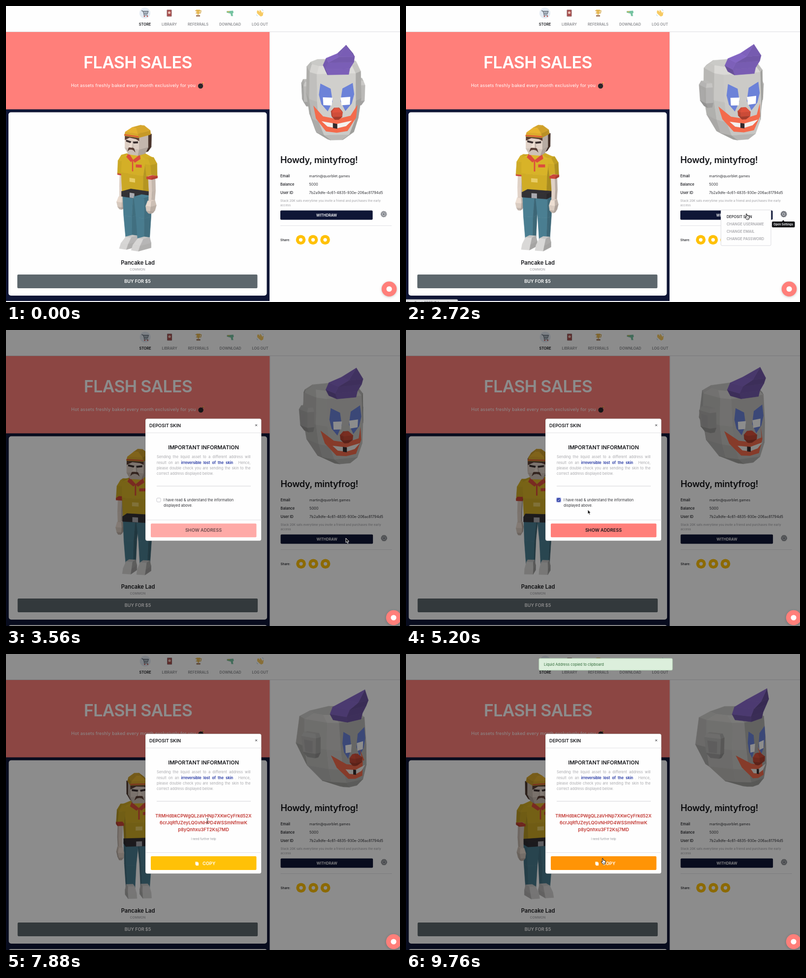
Animation, 800 px wide and 603 px high, one loop 9800 ms. Source, as an HTML page with a canvas:

```html
<!DOCTYPE html>
<html lang="en">
<head>
<meta charset="utf-8">
<title>Store</title>
<style>
html, body { margin: 0; width: 100%; height: 100%; overflow: hidden; background: #fefefe; }
canvas { display: block; width: 800px; height: 603px; }
</style>
</head>
<body>
<canvas id="stage" width="800" height="603"></canvas>
<script>
const ctx = document.getElementById('stage').getContext('2d');
const LOOP = 9800;
const CORAL = '#ff7f7a', NAVY = '#0f1636', AMBER = '#ffc107', INK = '#15161a', GREY = '#a9a9ad';
const MODAL_AT = 2920, CHECK_AT = 4740, ADDRESS_AT = 5950, TOAST_AT = 8720;
const clamp = v => Math.max(0, Math.min(1, v));
const ramp = (t, a, b) => { const k = clamp((t - a) / (b - a)); return k * k * (3 - 2 * k); };

// ---- drawing helpers ----
function text(s, x, y, size, weight, color, align = 'left', spacing = 0) {
  ctx.font = `${weight} ${size}px Inter, sans-serif`;
  ctx.letterSpacing = spacing + 'px';
  ctx.textAlign = align;
  ctx.fillStyle = color;
  ctx.fillText(s, x, y + size * 0.363);
  ctx.letterSpacing = '0px';
}
function box(x, y, w, h, r, fill, stroke) {
  ctx.beginPath();
  ctx.roundRect(x, y, w, h, r);
  if (fill) { ctx.fillStyle = fill; ctx.fill(); }
  if (stroke) { ctx.strokeStyle = stroke; ctx.lineWidth = 1; ctx.stroke(); }
}
function disc(x, y, r, fill) {
  ctx.beginPath();
  ctx.arc(x, y, r, 0, 7);
  ctx.fillStyle = fill;
  ctx.fill();
}
function poly(points, fill, stroke, width = 1) {
  ctx.beginPath();
  points.forEach(p => ctx.lineTo(p[0], p[1]));
  if (fill) { ctx.closePath(); ctx.fillStyle = fill; ctx.fill(); }
  if (stroke) { ctx.lineWidth = width; ctx.strokeStyle = stroke; ctx.lineJoin = 'round'; ctx.stroke(); }
}
function at(x, y, alpha, draw) {
  ctx.save();
  ctx.translate(x, y);
  ctx.globalAlpha *= alpha;
  draw();
  ctx.restore();
}
function rule(x, y, w, color = '#e2e2e6') {
  ctx.fillStyle = color;
  ctx.fillRect(x, y, w, 1);
}

// ---- low-poly models: stacked rings with flat shading ----
const ring = (y, x0, x1, z0, z1) => [[x0, y, z1], [x1, y, z1], [x1, y, z0], [x0, y, z0]];
const octagon = (y, wf, zf, ws, zm, zn, wb, zb) =>
  [[-wf, y, zf], [wf, y, zf], [ws, y, zm], [ws, y, zn], [wb, y, zb], [-wb, y, zb], [-ws, y, zn], [-ws, y, zm]];
const flip = pts => pts.map(([x, y, z]) => [-x, y, z]);
const mesh = (color, rings, decals = [], bias = 0) => ({ color, rings, decals, bias });
const mirrored = m => mesh(m.color, m.rings.map(flip), [], m.bias);
const decal = (color, pts, z) => ({ color, pts: pts.map(p => [p[0], p[1], p[2] ?? z]) });
const mean = pts => [0, 1, 2].map(i => pts.reduce((s, p) => s + p[i], 0) / pts.length);

function shade([r, g, b], k) {
  return `rgb(${[r, g, b].map(v => Math.min(255, v * k) | 0)})`;
}
function drawModel(meshes, cx, cy, degrees, tilt) {
  const c = Math.cos(degrees * Math.PI / 180), s = Math.sin(degrees * Math.PI / 180);
  const view = ([x, y, z]) => {
    const depth = z * c - x * s;
    return [cx + x * c + z * s, cy + y + depth * tilt, depth - y * tilt];
  };
  const spin = ([x, , z]) => z * c - x * s;
  const sorted = meshes.map(m => ({ m, depth: spin(mean(m.rings.flat())) + m.bias }))
    .sort((a, b) => a.depth - b.depth);
  for (const { m } of sorted) {
    const rings = m.rings.map(r => r.map(view));
    const middle = mean(rings.flat());
    const faces = [rings[0], rings[rings.length - 1]];
    for (let i = 1; i < rings.length; i++) {
      rings[i].forEach((p, j) => {
        const k = (j + 1) % rings[i].length;
        faces.push([rings[i - 1][j], rings[i - 1][k], rings[i][k], p]);
      });
    }
    for (const f of faces) {
      const [a, b] = [[f[2], f[0]], [f[3], f[1]]].map(([p, q]) => p.map((v, i) => v - q[i]));
      let n = [a[1] * b[2] - a[2] * b[1], a[2] * b[0] - a[0] * b[2], a[0] * b[1] - a[1] * b[0]];
      const size = Math.hypot(...n);
      if (size < 0.01) continue;
      const fc = mean(f);
      const out = n.reduce((sum, v, i) => sum + v * (fc[i] - middle[i]), 0) < 0 ? -1 : 1;
      n = n.map(v => v * out / size);
      if (n[2] <= 0) continue;
      const light = -0.12 * n[0] - 0.5 * n[1] + 0.8 * n[2];
      const color = shade(m.color, 0.72 + 0.3 * Math.max(0, light));
      poly(f, color, color, 0.6);
    }
    m.decals.forEach(d => poly(d.pts.map(view), d.color));
  }
}

// ---- mask ----
const wrap = pts => pts.map(([x, y]) => [x, y, 56 - Math.max(0, Math.abs(x) - 36) * 3]);
const eye = [[-33, -37], [-12, -26], [-8, 0], [-18, 20], [-31, 5], [-36, -14]];
const pupil = [[-28, -9], [-8, -8], [-10, 8], [-27, 7]];
const smile = [[-45, 12], [-28, 29], [0, 35], [28, 29], [45, 12], [41, 36], [22, 60], [0, 63], [-22, 60], [-41, 36]];
const teeth = [[-31, 39], [0, 45], [31, 39], [19, 50], [0, 54], [-19, 50]];
const BLUE = '#6c82d8', RED = '#f46b4c', BONE = [222, 221, 218];
const ear = mesh([205, 204, 202],
  [ring(-30, -60, -48, -30, 0), ring(-22, -63, -48, -34, 4), ring(10, -62, -46, -30, 2), ring(20, -56, -46, -24, -4)],
  [decal('#aaa9a8', [[-63.5, -16, -27], [-63.5, -16, -4], [-62.5, 8, -5], [-62.5, 8, -24]])], 1);
const mask = [
  mesh(BONE, [
    octagon(-68, 34, 30, 46, 10, -15, 30, -40),
    octagon(-55, 40, 46, 52, 25, -35, 36, -62),
    octagon(0, 40, 51, 53, 25, -35, 40, -68),
    octagon(40, 37, 54, 47, 25, -32, 30, -50),
    octagon(68, 26, 54, 38, 25, 0, 20, -10),
    octagon(79, 12, 50, 17, 40, 30, 8, 25)
  ], [
    decal(BLUE, eye, 52), decal(BLUE, flip(eye), 52),
    decal('#ffffff', pupil, 53), decal('#ffffff', flip(pupil), 53),
    decal(RED, wrap(smile)), decal('#f3f1ee', wrap(teeth)),
    decal('#33292b', [[-8, 43], [1, 45], [1, 55], [-8, 53]], 57)
  ]),
  ear, mirrored(ear),
  mesh([226, 84, 62], [ring(13, -5, 5, 52, 58), ring(20, -11, 11, 50, 65), ring(29, -10, 10, 50, 65), ring(36, -4, 4, 52, 58)], [], 10),
  mesh([140, 108, 208], [
    ring(-54, -18, 25, 12, 50), ring(-66, -23, 27, 8, 52), ring(-80, -17, 35, 10, 55),
    ring(-92, 4, 36, 25, 60), ring(-117, 18, 18, 66, 66)
  ], [], 30)
];

// ---- figure ----
const SKIN = [242, 226, 214], SHIRT = [226, 187, 42], HAIR = '#5a3f36';
function limb() {
  return [
    mesh(SKIN, [ring(342, 31, 40, -6, 6), ring(372, 33, 41, -6, 6), ring(396, 33, 40, -4, 7)]),
    mesh(SHIRT, [ring(306, 26, 34, -9, 9), ring(318, 27, 41, -11, 11), ring(344, 30, 43, -9, 10)], [], 1),
    mesh([220, 76, 60], [ring(343, 30, 43, -10, 10), ring(347, 30, 43, -10, 10)], [], 2),
    mesh(SKIN, [ring(392, 32, 41, -4, 9), ring(402, 30, 43, -6, 13), ring(412, 31, 41, -4, 12), ring(417, 34, 39, 0, 9)], [], 1),
    mesh([82, 139, 160], [ring(386, 1, 27, -13, 14), ring(428, 5, 26, -11, 12), ring(475, 7, 23, -10, 9)]),
    mesh([218, 217, 216], [ring(471, 8, 22, -12, 10), ring(482, 6, 24, -14, 24), ring(492, 6, 24, -14, 30)], [], 3)
  ];
}
const figure = [
  ...limb(), ...limb().map(mirrored),
  mesh(SHIRT, [ring(300, -12, 12, -9, 9), ring(308, -30, 30, -13, 12), ring(340, -28, 28, -14, 18), ring(382, -26, 26, -13, 17)], [
    decal('#dc4c3c', [[-14, 299, 11], [0, 311, 15], [14, 299, 11], [18, 307, 14], [5, 316, 16], [0, 312, 16], [-5, 316, 16], [-18, 307, 14]]),
    decal('#dc4c3c', [[-1.5, 312], [1.5, 312], [1.5, 334], [-1.5, 334]], 17),
    decal('#dc4c3c', [[8, 319], [23, 318], [23, 324], [8, 325]], 17),
    decal('#e8cd67', [[-7, 348], [7, 348], [7, 356], [-7, 356]], 18)
  ]),
  mesh([55, 53, 58], [ring(378, -27, 27, -14, 18), ring(388, -27, 27, -14, 18)],
    [decal('#aaaab0', [[-6, 378], [6, 378], [6, 388], [-6, 388]], 19)], 5),
  mesh([92, 66, 56], [ring(262, -20, 20, -21, 4), ring(288, -20, 20, -20, 2), ring(297, -15, 15, -16, 0)]),
  mesh(SKIN, [ring(262, -18, 18, -12, 18), ring(288, -18, 18, -12, 19), ring(301, -12, 12, -10, 15)], [
    decal(HAIR, [[-18, 262], [18, 262], [18, 270], [10, 267], [-6, 266], [-18, 272]], 19),
    decal('#3b3030', [[-15, 271], [-2, 273], [-2, 277], [-15, 275]], 19),
    decal('#3b3030', [[15, 271], [2, 273], [2, 277], [15, 275]], 19),
    decal(HAIR, [[-10, 294], [-7, 286], [0, 283], [7, 286], [10, 294], [5, 290], [0, 289], [-5, 290]], 21)
  ], 6),
  mesh(SKIN, [ring(275, -2, 2, 18, 20), ring(284, -4, 4, 18, 25)], [], 7),
  mesh([232, 180, 48], [ring(263, -18, 18, -21, 21), ring(255, -16, 16, -22, 20), ring(246, -5, 5, -17, 12)],
    [decal('#dc4c3c', [[-18, 260], [18, 260], [18, 262], [-18, 262]], 21)], 20)
];

// ---- small icons ----
const navIcons = [
  () => {
    disc(0, 0, 11, '#e3ebf4');
    poly([[-7, -5], [-4, -4], [-2, 2], [5, 2], [7, -4], [-3.5, -4]], '#a6b0bb', '#555f6c');
    poly([[-2, 2], [-2, 4.5], [6, 4.5]], null, '#555f6c');
    disc(-1, 6.5, 1.3, '#bd4b45'); disc(5, 6.5, 1.3, '#bd4b45');
  },
  () => {
    box(-5, -7, 10, 14, 1, '#72464c');
    box(-4, -6, 8, 12, 1, '#b24743');
    disc(0, -1, 2.6, '#f7dfcf');
  },
  () => {
    poly([[-6, -5], [6, -5], [5, 0], [-5, 0]], null, '#ce9b31', 1.5);
    poly([[-4, -7], [4, -7], [3, 0], [1, 2], [1, 4], [-1, 4], [-1, 2], [-3, 0]], '#e3ae39');
    box(-4, 4, 8, 3, 0, '#8b5b3c');
  },
  () => {
    poly([[-7, -4], [6, -5], [7, -1], [5, 1], [6, 6], [2, 6], [1, 1], [-7, -1]], '#52b48a');
    box(-6, -4, 5, 2, 0, '#e0b84d');
  },
  () => {
    poly([[-6, -4], [-4, -6], [0, -2], [-1, -6], [1, -6], [5, 0], [6, -3], [7, -2], [6, 5], [2, 7], [-2, 4], [-6, 0]], '#f5bd3c');
    poly([[-7, 3], [-5, 6]], null, '#77b8d8');
    poly([[4, -7], [7, -5]], null, '#77b8d8');
  }
];
function gear(x, y, color) {
  at(x, y, 1, () => {
    for (let i = 0; i < 12; i++) {
      ctx.rotate(Math.PI / 6);
      box(-1, -6.5, 2, 3, 0, color);
    }
    disc(0, 0, 5, color);
    disc(0, 0, 3.2, '#c9cacd');
    disc(0, 0, 1.8, '#5c626c');
  });
}
function bomb() {
  disc(395, 163, 5.2, '#292729');
  poly([[398, 159], [400, 157]], null, '#6b533f', 1.5);
  disc(400.5, 156.5, 1.2, '#ffc24a');
}

// ---- page ----
function drawPage(t) {
  ctx.fillStyle = '#fefefe';
  ctx.fillRect(0, 0, 800, 603);
  const open = t >= MODAL_AT;
  ctx.save();
  if (open) ctx.translate(0.6, 0);

  ['STORE', 'LIBRARY', 'REFERRALS', 'DOWNLOAD', 'LOG OUT'].forEach((label, i) => {
    const x = [282, 331.5, 390, 455, 515.5][i];
    at(x, 14.5, i ? 0.8 : 1, navIcons[i]);
    text(label, x, 37, 7.4, 600, i ? '#8d8e92' : INK, 'center');
  });
  rule(-1, 52, 802, '#dedee2');

  ctx.fillStyle = CORAL;
  ctx.fillRect(-1, 53, 536, 158);
  text('FLASH SALES', 267.5, 115, 34, 600, '#fff', 'center', -0.7);
  text('Hot assets freshly baked every month exclusively for you', 132, 162, 9, 400, '#fff', 'left', 0.18);
  bomb();
  ctx.fillStyle = NAVY;
  ctx.fillRect(-1, 210.5, 536, open ? 393 : 390.5);
  if (open) box(5, 601, 524, 8, 4, '#fefefe');
  box(5, 216.5, 524.5, 373.5, 5, '#fefefe');
  drawModel(figure, 267, 0, -36 + 5.6 * t / 1000, 0.2);
  text('Pancake Lad', 267.5, 523, 11.2, 600, INK, 'center');
  text('COMMON', 267, 536.5, 6.5, 500, GREY, 'center');
  box(23, 547, 487.5, 28, 2, '#5d676d');
  text('BUY FOR $5', 267, 561, 9.1, 600, '#fff', 'center');

  ctx.fillStyle = '#e6e6ea';
  ctx.fillRect(535, 53, 1, 550);
  drawModel(mask, 666, 184, 5.7 + 5.6 * t / 1000, 0.2);
  text('Howdy, mintyfrog!', 557, 313, 18.2, 600, INK, 'left', -0.36);
  const rows = [['Email', 'martin@quorblet.games'], ['Balance', '5000'], ['User ID', '7b2a9dfe-4c61-4835-930e-206ac81794d5']];
  rows.forEach(([label, value], i) => {
    text(label, 557, 346.5 + 17 * i, 7.4, 600, '#303136');
    text(value, 615.5, 346.5 + 17 * i, 7.3, 400, '#303136');
  });
  text('Stack 20K sats everytime you invite a friend and purchases the early', 557, 397, 6.1, 500, GREY, 'left', 0.06);
  text('access', 557, 406, 6.1, 500, GREY, 'left', 0.06);
  box(557, 416.5, 187.5, 19, 2, NAVY);
  text('WITHDRAW', 651, 426, 7.3, 600, '#fff', 'center');
  gear(767, 424, t > 1200 && !open ? '#62666d' : '#85888e');
  rule(557, 447, 226);
  text('Share:', 557, 476.5, 6.4, 600, '#303136');
  [598.5, 623.5, 648].forEach(x => {
    disc(x, 476.3, 9.8, AMBER);
    disc(x, 476.3, 3.6, '#fff');
  });
  ctx.restore();
}

function drawMenu(t) {
  if (t >= MODAL_AT) return;
  at(0, 0, ramp(t, 1220, 1430), () => {
    poly([[766, 436], [769, 439.5], [763, 439.5]], '#111216');
    box(743, 439, 46.5, 12, 2, '#111216');
    text('Open Settings', 766, 445, 5.8, 600, '#fff', 'center');
  });
  if (t < 1800) return;
  box(639.5, 415.5, 101.5, 72.5, 2, '#fefefe', '#dcdce0');
  ['DEPOSIT SKIN', 'CHANGE USERNAME', 'CHANGE EMAIL', 'CHANGE PASSWORD'].forEach((label, i) => {
    text(label, 651, 429 + 15.2 * i, 7.4, 600, !i && t > 2380 ? '#303136' : GREY);
  });
  if (t > 2420) {
    box(-2, 598, 107, 9, 2, '#dcdde0', '#bcbdc1');
    text('localhost:3000/#deposit', 3, 604, 7.3, 400, '#606165');
  }
}

function drawChat(t) {
  const [x, y] = t >= MODAL_AT ? [787, 586] : [778, 576.5];
  ctx.save();
  ctx.shadowColor = 'rgba(0,0,0,.22)';
  ctx.shadowBlur = 5;
  ctx.shadowOffsetY = 1;
  disc(x, y, 15.3, CORAL);
  ctx.restore();
  disc(x, y, 5.6, '#fff');
}

// ---- dialog ----
function justified(runs, x, y, width) {
  const words = runs.flatMap(([s, bold]) => s.split(' ').map(w => [w, bold]));
  const font = bold => `${bold ? 700 : 400} 7.4px Inter, sans-serif`;
  const sizes = words.map(([w, bold]) => { ctx.font = font(bold); return ctx.measureText(w).width; });
  const gap = (width - sizes.reduce((a, b) => a + b)) / (words.length - 1);
  words.forEach(([w, bold], i) => {
    text(w, x, y, 7.4, bold ? 700 : 400, bold ? '#3142a8' : GREY);
    x += sizes[i] + gap;
  });
}
function drawDialog(t) {
  if (t < MODAL_AT) return;
  ctx.fillStyle = `rgba(0,0,0,${0.45 * ramp(t, MODAL_AT, MODAL_AT + 150)})`;
  ctx.fillRect(0, 0, 800, 603);
  drawChat(t);
  const show = ramp(t, MODAL_AT + 80, MODAL_AT + 380);
  const issued = t >= ADDRESS_AT;
  const top = issued ? 162.5 : 180.5, height = issued ? 285 : 249;
  at(0, top - 32 * (1 - show), show, () => {
    box(283, 0, 235.5, height, 4, '#fefefe', 'rgba(0,0,0,.18)');
    text('DEPOSIT SKIN', 291, 14.3, 9.2, 600, INK);
    poly([[506, 11.5], [510, 15.5]], null, '#55565a');
    poly([[510, 11.5], [506, 15.5]], null, '#55565a');
    rule(283.5, 28.5, 235);
    text('IMPORTANT INFORMATION', 401, 58.5, 10.8, 600, INK, 'center');
    justified([['Sending the liquid asset to a different address will']], 306, 78.2, 190.5);
    justified([['result on an'], ['irreversible lost of the skin', true], ['. Hence,']], 306, 89.6, 190.5);
    justified([['please double check you are sending the skin to the']], 306, 101, 190.5);
    text('correct address displayed below.', 306, 112.3, 7.4, 400, GREY);
    rule(306, 137, 191, '#d5d5da');
    if (issued) drawAddress(t); else drawConsent(t);
  });
}
function drawConsent(t) {
  const checked = t >= CHECK_AT;
  if (checked) {
    box(304.5, 160.3, 11, 11, 3, '#ccd1f2');
    box(306, 161.8, 8, 8, 2, '#3949ab');
    poly([[308, 166], [309.5, 167.5], [312.2, 164.3]], null, '#fff');
  } else {
    box(306, 161.8, 8, 8, 2, '#fff', '#c8c8cf');
  }
  text('I have read & understand the information', 320, 165.8, 7.4, 400, '#303136');
  text('displayed above.', 320, 177.2, 7.4, 400, '#303136');
  rule(283.5, 206, 235);
  at(0, 0, checked ? 1 : 0.65, () => {
    box(294, 213.8, 214.5, 28, 2, CORAL);
    text('SHOW ADDRESS', 401, 227.5, 9.1, 600, INK, 'center');
  });
}
function drawAddress(t) {
  ['TRMHdbkCPWgQLzaVHNp7XKwCyFrkd52X', '6crJqRfUZeyLQGvNHPD4WSSmNfmwK', 'p8yQnhxu3FT2Ksj7MD'].forEach((line, i) => {
    text(line, 401, 167 + 14 * i, 9.2, 600, '#c23833', 'center');
  });
  text('I need further help', 401, 214, 5.85, 400, '#97979c', 'center');
  rule(283.5, 241.5, 235);
  box(294, 249.5, 214.5, 28, 2, t > 8400 ? '#ff9406' : AMBER);
  box(384, 260.5, 5.5, 6.5, 1, '#ffe9b0');
  box(385.5, 262, 5.5, 6.5, 1, '#fff');
  text('COPY', 399, 264, 9.2, 600, '#fff');
}

function drawToast(t) {
  const k = ramp(t, TOAST_AT, TOAST_AT + 240);
  if (!k) return;
  at(0, -24 * (1 - k), k, () => {
    box(270, 9, 271, 24, 2, '#dcefdc', '#b5d3b6');
    text('Liquid Address copied to clipboard', 280, 21, 7.4, 400, '#2f6a38');
  });
}

// ---- pointer ----
const stops = [
  [850, 803, 470], [1200, 769, 423], [1900, 769, 423], [2450, 693, 429], [2950, 693, 429],
  [3200, 690, 424], [3750, 690, 424], [4450, 311, 347], [4900, 311, 347], [5200, 369, 366],
  [5600, 401, 408], [6250, 401, 408], [6900, 409, 340], [8080, 409, 340], [8520, 401, 422], [9800, 401, 422]
];
function drawPointer(t) {
  const i = stops.findIndex(s => s[0] > t);
  if (i < 1) return;
  const [a, b] = [stops[i - 1], stops[i]];
  const k = ramp(t, a[0], b[0]);
  const within = (from, to) => t >= from && t < to;
  at(a[1] + (b[1] - a[1]) * k, a[2] + (b[2] - a[2]) * k, 1, () => {
    if (within(6550, 8250)) {
      poly([[-2, -5], [0, -4], [2, -5]], null, '#222', 0.9);
      poly([[0, -4], [0, 4]], null, '#222', 0.9);
      poly([[-2, 5], [0, 4], [2, 5]], null, '#222', 0.9);
    } else if (within(1150, 2000) || within(2330, 3000) || within(5520, 6400) || t >= 8400) {
      const hand = [[-2.5, -5.5], [-1, -5.5], [-0.3, -1.8], [3.8, -0.8], [4.2, 2], [2.8, 6], [-1.2, 6], [-4.5, 1.8], [-4, 0.5], [-2, 1.6]];
      poly([...hand, hand[0]], '#fff', '#18181b', 1);
      poly([[0, 2], [0.3, 4.2]], null, '#18181b', 0.6);
      poly([[1.8, 2], [1.8, 4.2]], null, '#18181b', 0.6);
    } else {
      const arrow = [[0, 0], [0, 9], [2, 7.2], [3.5, 10.5], [5, 9.8], [3.7, 6.7], [6.3, 6.5]];
      poly([...arrow, arrow[0]], '#111', '#fff', 0.9);
    }
  });
}

function frame(now) {
  const t = now % LOOP;
  drawPage(t);
  drawMenu(t);
  if (t < MODAL_AT) drawChat(t);
  drawDialog(t);
  drawToast(t);
  drawPointer(t);
  requestAnimationFrame(frame);
}
requestAnimationFrame(frame);
</script>
</body>
</html>
```
